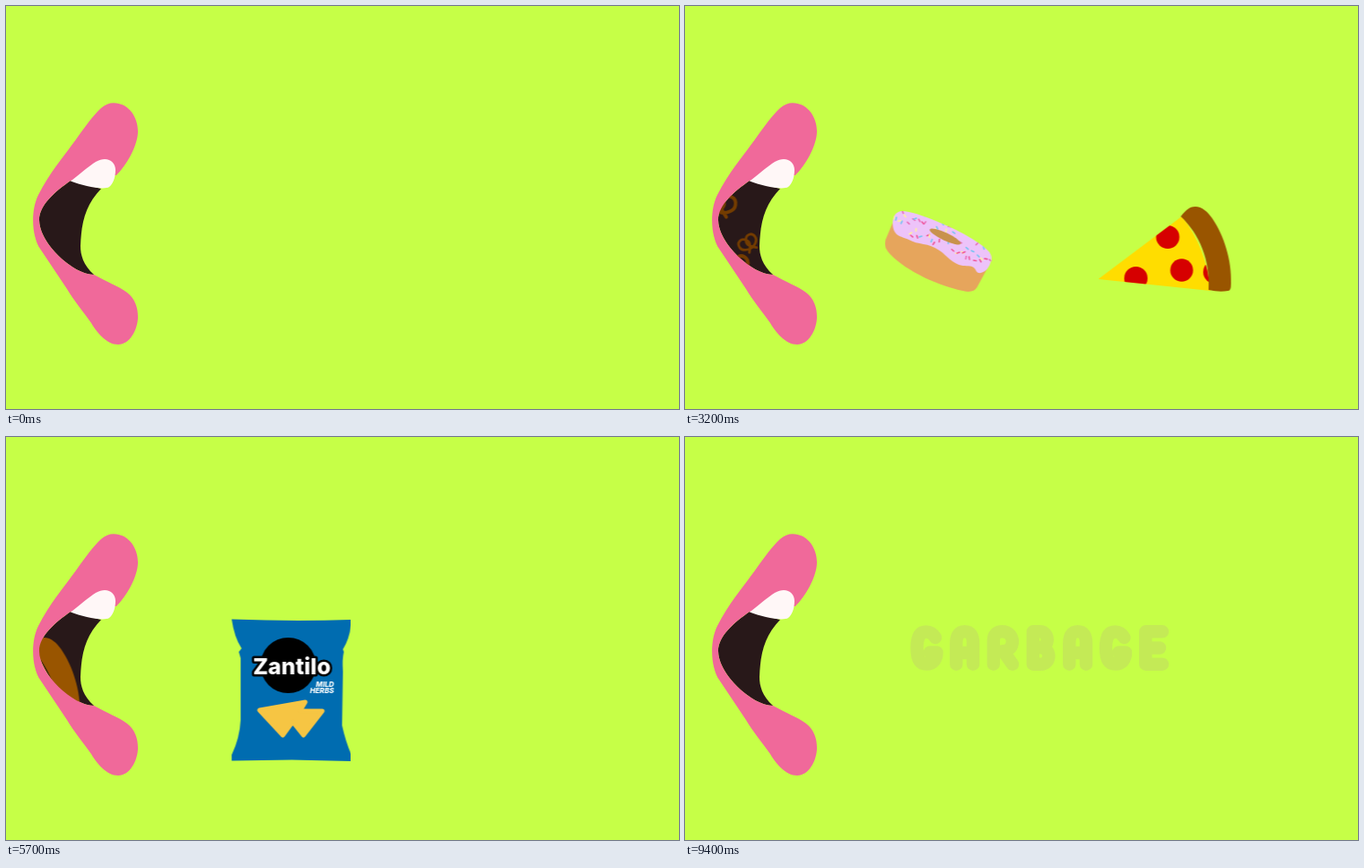
An HTML page for the animation above (9800 ms loop, 750 by 450 pixels).

```html
<!DOCTYPE html>
<html lang="en">
<head>
<meta charset="utf-8">
<title>Garbage</title>
<style>
  html, body { margin: 0; width: 100%; height: 100%; overflow: hidden; background: #c6ff47; }
  svg { display: block; width: 100vw; height: 100vh; }

  .snacks { animation: feed 9.8s -5ms infinite; }
  .word {
    fill: none; stroke: #b400ff; stroke-width: 14.5;
    stroke-linecap: round; stroke-linejoin: round;
    animation: fade 9.8s -5ms infinite;
  }
  .pretzels { fill: none; stroke: #733c00; stroke-width: 4; stroke-linecap: round; }
  .sprinkles { stroke-width: 1.6; stroke-linecap: round; }
  .brand { font: 800 25px Inter, "Open Sans", sans-serif; fill: #fff; stroke: #000; stroke-width: 5; paint-order: stroke; stroke-linejoin: round; }
  .flavor { font: italic 800 8px Inter, "Open Sans", sans-serif; fill: #fff; }

  /* The conveyor advances ten times a second. */
  @keyframes feed {
    0%      { transform: translateX(1013px);   animation-timing-function: steps(20); }
    20.408% { transform: translateX(449px);    animation-timing-function: steps(4); }
    24.490% { transform: translateX(361px);    animation-timing-function: steps(16); }
    40.816% { transform: translateX(0);        animation-timing-function: steps(10); }
    51.020% { transform: translateX(-197.5px); animation-timing-function: steps(10); }
    61.224% { transform: translateX(-409px);   animation-timing-function: steps(5); }
    66.327% { transform: translateX(-564.5px); animation-timing-function: steps(5); }
    71.429% { transform: translateX(-671px);   animation-timing-function: steps(1); }
    72.449%, 100% { transform: translateX(-710px); }
  }
  @keyframes fade {
    0%, 73.469% { opacity: 0;   animation-timing-function: steps(4); }
    77.551%     { opacity: .96; animation-timing-function: steps(1); }
    78.571%     { opacity: .96; animation-timing-function: steps(5); }
    83.673%     { opacity: 1;   animation-timing-function: steps(1); }
    85.714%     { opacity: 1;   animation-timing-function: steps(10); }
    95.918%, 100% { opacity: .08; }
  }
</style>
</head>
<body>
<svg viewBox="0 0 750 450">
  <defs>
    <clipPath id="throat"><path d="M125 110L52 192L33 232V242L43 268L70 305L118 372V450H750V0H125Z"/></clipPath>
    <clipPath id="slice"><path d="M280 305L373 235Q401 270 405 318Z"/></clipPath>
    <clipPath id="icing"><path id="icingShape" d="M412 244C412 236 414 230 422 229C432 229 445 234 460 240C485 250 508 263 518 273C524 278 522 288 517 294C512 299 506 300 504 294C501 289 496 291 490 290C478 288 473 279 464 273C452 264 440 267 430 261C422 257 413 258 412 244Z"/></clipPath>
    <path id="pretzel" d="M0-6C-4-14-15-12-15-2C-15 5-6 9 0 9C6 9 15 5 15-2C15-12 4-14 0-6C5 0 0 6-7 13M0-6C-5 0 0 6 7 13"/>
    <path id="G" d="M28 14C25 9 22 7.5 18 7.5C10 7.5 7.5 15 7.5 25.5S10 43.5 18 43.5C26 43.5 29.5 38 29.5 30.5H22"/>
    <path id="A" d="M7.3 43.7V20Q7.3 7.3 16.7 7.3T26 20V43.7M7.3 31H26"/>
    <path id="R" d="M7.3 43.7V18Q7.3 7.3 17 7.3C32 7.3 32 29 18 29L28.5 43.7"/>
    <path id="B" d="M7.3 9V43.7H16C28 43.7 28 25 15 25C26 25 26 7.3 15 7.3H7.3"/>
    <path id="E" d="M26 7.3H7.3V43.7H26M7.3 25.5H23"/>
  </defs>

  <path fill="#281819" d="M72 195C55 207 37 222 37 239C37 265 75 300 98 300C86 289 83 278 83 268C84 240 89 222 106 204Z"/>

  <g clip-path="url(#throat)">
    <g class="snacks">
      <g transform="translate(-361)">
        <g class="pretzels" id="pretzels"></g>
        <path fill="#e6a55c" d="M412 242L404 261Q401 269 409 277C428 297 465 313 490 318Q502 321 506 314L519 290Z"/>
        <use href="#icingShape" fill="#edc3f9"/>
        <g class="sprinkles" id="sprinkles" clip-path="url(#icing)"></g>
        <ellipse cx="470.5" cy="257.500" rx="19" ry="4.300" fill="#c8924c" transform="rotate(25 470.5 257.5)"/>
      </g>

      <g clip-path="url(#slice)">
        <path fill="#fd0" d="M270 220H430V330H270Z"/>
        <g fill="#d60000">
          <circle cx="357.500" cy="258" r="13"/><circle cx="373" cy="295" r="12.700"/>
          <circle cx="322" cy="304" r="13"/><circle cx="410" cy="297" r="13"/>
        </g>
      </g>
      <path fill="#950" d="M372 235C378 227 383 224 388 224C396 224 402 230 407 237C420 256 429 284 428 310Q428 318 425 318Q415 320 403 317C405 284 393 255 372 235Z"/>

      <path fill="#006cb0" d="M597 203.500Q664 206 730 204V210Q728 226 721 237L722 240Q720 248 721 262L720 322Q724 340 730 354V362L664 360.500L597 361.500V355Q606 336 607 316L607 247L605 240L608 236Q600 224 597 203.500Z"/>
      <circle cx="660" cy="255" r="31"/>
      <text class="brand" x="664" y="265" text-anchor="middle">Zantilo</text>
      <g class="flavor" text-anchor="end"><text x="711" y="279">MILD</text><text x="711" y="285.500">HERBS</text></g>
      <path fill="#f6c543" stroke="#f6c543" stroke-width="5" stroke-linejoin="round" d="M628 305L679 296L673 306H698L677 333L665 318L654 333Z"/>
    </g>
  </g>

  <path fill="#f0699a" d="M123 108.500C137 110 147 124 147 140C147 156 134 178 123 189L108 190L72 195C55 207 37 222 37 239C37 265 75 300 98 300C112 308 126 313 135 320C144 327 147 337 147 347C147 361 138 378 125 378C112 378 101 364 95 354C85 340 75 328 68 316L38 271C29 258 27 229 36 211C48 187 65 167 78 149C88 135 97 122 106 114Q114 107 123 108.500Z"/>
  <path fill="#fff7f7" d="M72 195.500C82 188 92 179 100 174C112 167 122 173 122 183C122 192 119 199 115 202C109 206 86 201 72 195.500Z"/>

  <g class="word" role="img" aria-label="GARBAGE" id="word"></g>
</svg>
<script>
  const add = (parent, tag, attrs) => {
    const node = document.createElementNS("http://www.w3.org/2000/svg", tag);
    for (const key in attrs) node.setAttribute(key, attrs[key]);
    document.getElementById(parent).append(node);
  };

  // x, y, rotation, scale
  [[131.5, 245, -25, 1], [169.500, 252, 20, .85], [144, 270, 10, .7], [222, 222, 10, .97],
   [197, 294, -25, .82], [235, 288, 15, 1], [251, 265, -35, .7]]
    .forEach(([x, y, turn, size]) => add("pretzels", "use", {
      href: "#pretzel", transform: `translate(${x} ${y}) rotate(${turn}) scale(${size})`
    }));

  let seed = 7;
  const random = () => (seed = seed * 16807 % 2147483647) / 2147483647;
  const tints = ["#f0569b", "#79c4f2", "#fff0a0", "#e86fb8"];
  for (let i = 0; i < 60; i++) {
    const x = 412 + (i * 0.618 % 1) * 110;
    const y = 231 + (x - 412) * .43 + (random() - .5) * 34;
    add("sprinkles", "path", {
      d: "M-1.5 0H1.5", stroke: tints[i % tints.length],
      transform: `translate(${x} ${y}) rotate(${random() * 180})`
    });
  }

  const starts = [251, 295, 336.5, 380.5, 421, 461.5, 506];
  [..."GARBAGE"].forEach((letter, i) => add("word", "use", { href: "#" + letter, x: starts[i], y: 210 }));
</script>
</body>
</html>
```
